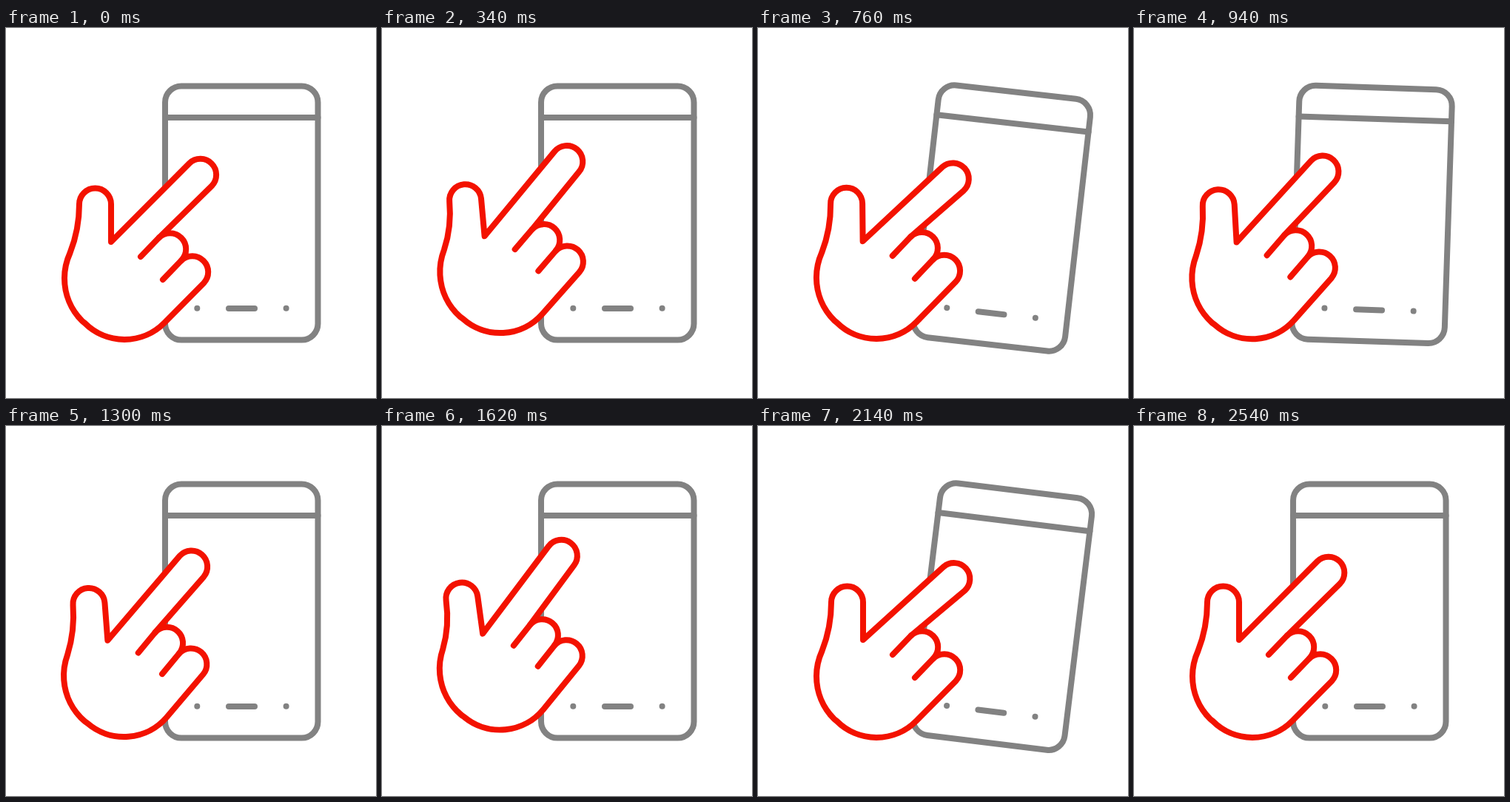
Write an HTML page that moves like this. It is 500 px wide and 500 px high and loops after 3 s.

```html
<!DOCTYPE html>
<html lang="en">
<head>
<meta charset="utf-8">
<title>Double tap</title>
<style>
  html, body { margin: 0; width: 100%; height: 100%; overflow: hidden; background: #fff; }
  svg { display: block; width: 100%; height: 100%; }
</style>
</head>
<body>
<svg viewBox="0 0 500 500" fill="none" stroke-width="8" stroke-linecap="round" stroke-linejoin="round">
  <g id="phone" stroke="#828282">
    <rect x="215" y="78.5" width="206.5" height="343" rx="22"/>
    <path d="M215 121H421.5M301 379H336M258.3 378.7h.01M378.6 378.7h.01"/>
  </g>
  <g id="hand" stroke="#f31200">
    <path id="skin" fill="#fff"/>
    <path id="folds"/>
  </g>
</svg>
<script>
const LOOP = 3000, STEP = 20;
const R = 21.5;                  // fingertip radius
const FORK = [142, 289];         // between thumb and index finger
const KNUCKLE = [206.8, 283.3];  // where index meets middle finger
const phone = document.getElementById('phone');
const hand = document.getElementById('hand');
const skin = document.getElementById('skin');
const folds = document.getElementById('folds');

const smooth = p => p < 0.5 ? 2 * p * p : 1 - 2 * (1 - p) ** 2;
const settle = p => 1 - (1 - p) ** 4;
const mix = (a, b, p) => a + (b - a) * p;

// turn: palm angle, lift: hand raised, press: phone pushed
const REST = { turn: 0, lift: 0, press: 0 };
const PEAK = { turn: 6.4, lift: 1, press: 0 };
const PUSH = { turn: 0, lift: 0, press: 1 };
const HOVER = { turn: 4.4, lift: 0, press: 0 };
const CONTACT = 0.24;            // part of the downstroke before touching

const keys = [
  [120, REST],
  [560, PEAK, smooth],
  [800, PUSH, smooth, CONTACT],
  [1300, HOVER, settle],
  [1900, PEAK, smooth],
  [2140, PUSH, smooth, CONTACT],
  [2640, REST, settle]
];

function poseAt(t) {
  const i = keys.findIndex(k => t < k[0]);
  if (i < 1) return REST;
  const [t0, a] = keys[i - 1];
  const [t1, b, ease, delay = 0] = keys[i];
  const p = ease((t - t0) / (t1 - t0));
  const touch = Math.max(0, (p - delay) / (1 - delay));
  return {
    turn: mix(a.turn, b.turn, p),
    lift: mix(a.lift, b.lift, p),
    press: mix(a.press, b.press, touch)
  };
}

const str = pt => pt.map(v => v.toFixed(2)).join(' ');
const arc = (r, pt) => `A${r} ${r} 0 0 1 ${str(pt)}`;

// Touching point on a circle seen from p; side is -1 or 1
function tangent(p, c, side) {
  const dx = c[0] - p[0], dy = c[1] - p[1], d = Math.hypot(dx, dy);
  const a = Math.atan2(dy, dx) + side * Math.asin(R / d);
  const len = Math.sqrt(d * d - R * R);
  return [p[0] + len * Math.cos(a), p[1] + len * Math.sin(a)];
}

function spin([x, y], [cx, cy], deg) {
  const a = deg * Math.PI / 180, c = Math.cos(a), s = Math.sin(a);
  return [cx + (x - cx) * c - (y - cy) * s, cy + (x - cx) * s + (y - cy) * c];
}

function outline({ lift, press }) {
  const tip = [263 - 9.3 * lift + 2.5 * press, 198 - 6.2 * lift + 8 * press];
  const thumb = (x, y) => spin([x, y], FORK, -4 * lift);
  const a = tangent(FORK, tip, -1), b = tangent(KNUCKLE, tip, 1);
  const reach = Math.hypot(b[0] - a[0], b[1] - a[1]);
  const bend = ((tip[0] - a[0]) * (b[1] - a[1]) - (tip[1] - a[1]) * (b[0] - a[0])) < 0 ? 1 : 0;
  const large = reach < 2 * R && bend ? 1 : 0;
  return [
    'M' + str(FORK), 'L' + str(a),
    `A${R} ${R} 0 ${large} 1 ${str(b)}`, 'L' + str(KNUCKLE),
    arc(R, [237.2, 313.7]), 'L236.8 314.3', arc(R, [267.2, 344.7]),
    'L213.7 398.7', arc(76, [106.3, 398.7]), 'L103 396', arc(82, [79, 338]),
    'C79 324 82 314 86.5 304',
    'C94 285 ' + str(thumb(99, 262)) + ' ' + str(thumb(99, 238)),
    arc(R, thumb(142, 238)), 'Z'
  ].join('');
}

folds.setAttribute('d', `M182 309L${str(KNUCKLE)}M212 340L236.8 314.3`);

function draw(t) {
  const pose = poseAt(t);
  phone.setAttribute('transform', `rotate(${7 * pose.press} 262 352)`);
  hand.setAttribute('transform', `translate(0 ${-16.3 * pose.lift}) rotate(${-pose.turn} 148 350)`);
  skin.setAttribute('d', outline(pose));
}

const start = performance.now();
function tick() {
  const t = (performance.now() - start) % LOOP;
  draw(Math.floor(t / STEP) * STEP);
  requestAnimationFrame(tick);
}
draw(0);
requestAnimationFrame(tick);
</script>
</body>
</html>
```
